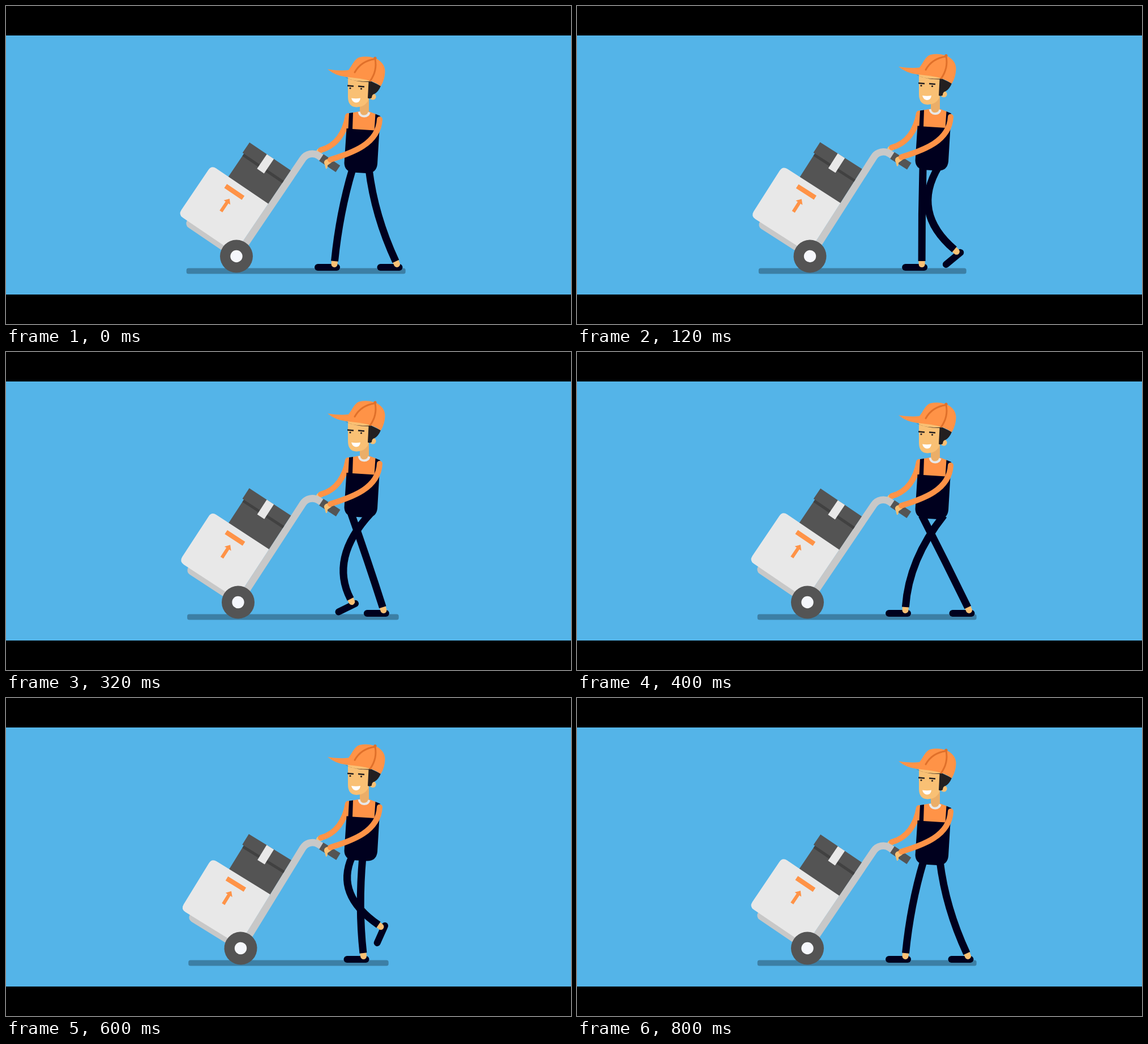
An HTML page that plays this animation: 998 px wide and 561 px high, repeating every 0.84 s.

```html
<!DOCTYPE html>
<html lang="en">
<head>
<meta charset="utf-8">
<title>Delivery walk</title>
<style>
html, body { margin: 0; width: 100%; height: 100%; overflow: hidden; background: #000; }
svg { display: block; width: 100vw; height: 100vh; }
.navy { fill: #00001e; }
.orange { fill: #ff9347; }
.skin { fill: #f9c074; }
.dark { fill: #545454; }
.light { fill: #e8e8e8; }
.hair { fill: #231f20; }
.line { fill: none; }
.arm { stroke: #ff9347; stroke-width: 10; stroke-linecap: round; }
.seam { stroke: #e0702a; stroke-width: 3; stroke-linecap: round; }
.brow { stroke: #231f20; stroke-width: 2.4; }
</style>
</head>
<body>
<svg viewBox="0 0 998 561">
  <rect y="52" width="998" height="457" fill="#54b4e8"/>
  <rect id="shadow" y="462.5" height="10" rx="3.5" fill="#3c7fa5"/>

  <g class="bob">
    <path class="skin" d="M559 250L551 252Q546 256 549 261L559 259Z"/>
    <path class="line arm" stroke-linecap="butt" d="M604 194C599 222 584 247 556 254"/>
  </g>

  <g id="trolley">
    <g transform="translate(363 281) rotate(34.1)">
      <rect x="19" y="92" width="108" height="22" rx="9" fill="#c8c8c8"/>
      <path class="line" stroke="#c8c8c8" stroke-width="12.5" d="M127.2 112V-100A20 20 0 0 1 147 -120H154"/>
      <rect class="dark" x="153" y="-127" width="35.5" height="14"/>
      <path class="dark" d="M33 -71H121V1H36V-49H33Z"/>
      <rect x="36" y="-49" width="85" height="5" fill="#414141"/>
      <rect class="light" x="70" y="-71" width="15" height="31"/>
      <path class="light" d="M10 0H121V105H10Q0 105 0 95V10Q0 0 10 0Z"/>
      <path class="orange" d="M41 12H78.5V20.5H41ZM59.5 31L66.5 39H62.5V58H56.5V39H52.5Z"/>
    </g>
    <circle class="dark" cx="407" cy="441.5" r="29"/>
    <circle cx="407" cy="441.5" r="10.7" fill="#f5f7fc"/>
  </g>

  <g id="legs"></g>

  <g class="bob">
    <path class="orange" d="M602 190L624 186H641L654 191L661 196L658 222H600Z"/>
    <path fill="#ebae68" d="M625 165H641V186Q640 193 633 193Q626 193 625 186Z"/>
    <path class="line" stroke="#e8e8e8" stroke-width="4" d="M623.5 186.5Q625 194.5 632.5 194.5Q640 194.5 641.5 187.5"/>
    <path class="navy" d="M606 189L613 188L612 217L659.5 220L656 279Q654 295.5 637 295L612 293.5Q598 291 597.5 277L601.5 216H604.5ZM652.5 190.5L661 194L658 221H650.5Z"/>

    <path class="skin" d="M604 124V160Q604 178 619 178.500Q638 178 642 160V128Z"/>
    <circle class="skin" cx="648" cy="160" r="5.6"/>
    <path class="hair" d="M599 125Q612 134 642 133L641 131L662 141Q658 151 651 155Q646 156 646 162Q643 164 639 162.500L640.500 134Q614 134 599 125Z"/>
    <path class="line brow" d="M603 140.500L614 141.500M622 141.500L633 142.500"/>
    <circle class="hair" cx="608" cy="145" r="1.6"/>
    <circle class="hair" cx="627.500" cy="146" r="1.6"/>
    <path fill="#fff" d="M610 162.500Q618 164 626 162.500Q625 170.500 618 170.500Q612 170 610 162.500Z"/>
    <path class="orange" d="M568 111.500Q590 115 605 113C612 104 615 94 624 90.500Q638 87.500 650 91.500C662 95 670 105 669.500 116Q669 130 662 141.500Q648 131 625 128L600 125Q582 123 568 111.500Z"/>
    <path class="line seam" d="M616 117Q627 97 652 93.500Q656 114 643.500 132"/>
    <circle cx="652" cy="92" r="2.6" fill="#e0702a"/>

    <path class="skin" d="M575 268L565 271Q560 274 563 280L565 287Q568 288 568 281L575 276Z"/>
    <path class="line arm" d="M660 200C658 243 612 259 573 271" stroke-linecap="butt"/>
  </g>
</svg>
<script>
const FRAME = 40, LOOP = 840, CYCLE = 800, KEY = 200;

// Key poses every 200 ms: hip x, knee x, knee y, ankle x, ankle y, foot angle
const poses = [
  [[612, 589, 365, 580, 455, 0], [610.5, 622, 368, 628.5, 455, 0],
   [609, 651, 370, 692.5, 455, 0], [611, 581, 347, 662, 403, -66]],
  [[641, 651, 370, 690.5, 455, 0], [637, 549, 360, 657, 418, -66],
   [648, 586, 366, 580, 455, 0], [630, 622, 368, 631.5, 455, 0]]
];

const $ = id => document.getElementById(id);
const set = (el, attrs) => { for (const k in attrs) el.setAttribute(k, attrs[k]); };

function add(parent, tag, attrs) {
  const el = document.createElementNS('http://www.w3.org/2000/svg', tag);
  set(el, attrs);
  return parent.appendChild(el);
}

const legs = poses.map(keys => ({
  keys,
  shoe: add($('legs'), 'rect', { class: 'navy', x: -35, width: 45, height: 12, rx: 6 }),
  ankle: add($('legs'), 'path', { stroke: '#f9c074', 'stroke-width': 11, 'stroke-linecap': 'round' }),
  limb: add($('legs'), 'path', { class: 'line', stroke: '#00001e', 'stroke-width': 13 })
}));
const bobbing = document.querySelectorAll('.bob');

function drawLeg({ keys, shoe, ankle, limb }, t, lift) {
  const i = Math.floor(t / KEY), f = t / KEY - i;
  const next = keys[(i + 1) % keys.length];
  const [hx, kx, ky, ax, ay, angle] = keys[i].map((v, n) => v + (next[n] - v) * f);
  const len = Math.hypot(ax - kx, ay - ky);
  const ex = ax - 5 * (ax - kx) / len, ey = ay - 5 * (ay - ky) / len;
  set(shoe, { transform: `translate(${ax} ${ay}) rotate(${angle})` });
  set(ankle, { d: `M${ex} ${ey}L${ax} ${ay + 0.5}` });
  set(limb, { d: `M${hx} ${288 - lift}Q${kx} ${ky} ${ex} ${ey}` });
}

function draw(now) {
  const t = Math.floor(now % LOOP / FRAME) * FRAME % CYCLE;
  const rise = 1 - Math.abs(t % (2 * KEY) / KEY - 1);
  const lift = 7.5 * rise;
  const left = 318.7 + 3.5 * rise;
  set($('shadow'), { x: left, width: 705.7 - 30 * rise - left });
  set($('trolley'), { transform: `translate(${lift} 0) rotate(${-2.48 * rise} 407 441.5)` });
  bobbing.forEach(el => set(el, { transform: `translate(0 ${-lift})` }));
  legs.forEach(leg => drawLeg(leg, t, lift));
}

function tick() {
  draw(performance.now());
  requestAnimationFrame(tick);
}
tick();
</script>
</body>
</html>
```
